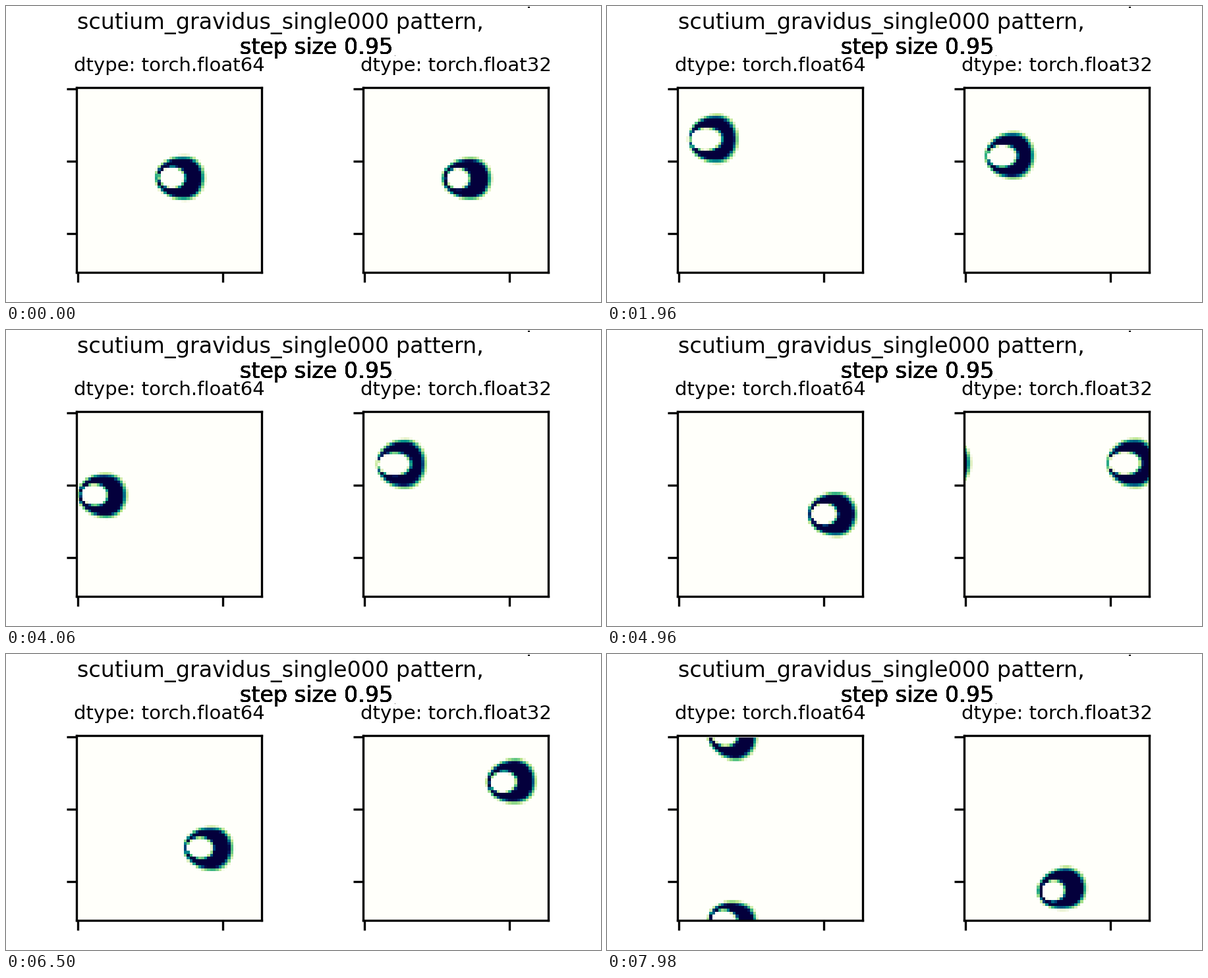
A matplotlib script that plays this animation: 903x450 px, repeating every 8 s.

```python
import numpy as np
import matplotlib.pyplot as plt
from matplotlib.animation import FuncAnimation
from matplotlib.colors import LinearSegmentedColormap
from matplotlib.patches import Rectangle

W, H, DPI = 903, 450, 300
FRAMES, INTERVAL = 400, 20
N = 64                      # cells per side
SIDE = 281                  # panel side in pixels
CELL = SIDE / N
TOP, LEFT = 124.2, (107, 542)
SPEED = 10.6                # pixels per frame

CMAP = LinearSegmentedColormap.from_list("lagoon", [
    (0, "#fffffa"), (0.12, "#f0f5d8"), (0.3, "#b9e68c"), (0.5, "#46be82"),
    (0.65, "#008c8c"), (0.8, "#004c82"), (0.9, "#04165a"), (1, "#04003c")])


def bump(n, centre, width, power=2):
    return np.exp(-(abs(n - centre) / width) ** power)


def travel(n, lag, brake):
    """Distance along x: steady, with an early lag and a late slowdown."""
    return (265 + SPEED * n - lag * (1 - np.exp(-n / 60))
            - brake * (n / FRAMES) ** 10)


def weaving(n):
    """Swings up and down, then dives; returns x, y and half height."""
    y = (241 - 42 * np.cos(2 * np.pi * (n - 118) / 290)
         - 14 * np.exp(-n / 15) + 0.218 * max(0, n - 285) ** 1.45)
    return travel(n, 22, 68), y, 7.8 + 1.2 * bump(n, 127, 45)


def climbing(n):
    """Rises to a level flight, then climbs off the top."""
    y = 203 + 60 * bump(n, 0, 105) - 0.138 * max(0, n - 310) ** 1.52
    return travel(n, 3, 21), y, 7.4 + 1.3 * bump(n, 200, 125, 4)


def glider(cx, cy, angle, size):
    """Crescent with a soft rim, centred at a cell position."""
    j, i = np.mgrid[0:N, 0:N]
    dx = (i - cx + N / 2) % N - N / 2
    dy = (j - cy + N / 2) % N - N / 2
    u = dx * np.cos(angle) + dy * np.sin(angle)
    w = dy * np.cos(angle) - dx * np.sin(angle)

    du = u - 1.6
    reach = np.where(du > 0, 7.3, 10.8)
    rim = (1 - np.hypot(du / reach, w / (size + 0.4))) * 8
    body = rim / np.interp(u, [-8, 0, 8], [0.9, 1.7, 2.5])

    grow = (size - 7.4) / 1.5
    hx, hy = 3.5 + 1.7 * grow, 3.1 + 0.4 * grow
    hu = u + 3.5 - 0.7 * grow
    gap = (np.hypot(hu / hx, w / hy) - 1) * hy
    hole = gap / np.interp(hu, [-hx, hx], [0.5, 1.2])

    cells = np.clip(np.minimum(body, hole), 0, 1)
    cells[0] = 0            # the top row stays empty
    return cells


def state(path, n):
    x, y, size = path(n)
    dx, dy, _ = np.subtract(path(n + 2), path(max(n - 2, 0)))
    return glider((x - LEFT[0]) / CELL - 0.5, (y - TOP) / CELL - 0.5,
                  np.arctan2(dy, dx), size)


plt.rcParams["font.family"] = "DejaVu Sans"
fig = plt.figure(figsize=((W + 0.001) / DPI, (H + 0.001) / DPI), dpi=DPI,
                 facecolor="white")


def label(x, y, text):
    fig.text(x / W, 1 - y / H, text, fontsize=8, ha="left", va="baseline")


def speck(x, y, w, h, color):
    fig.add_artist(Rectangle((x / W, 1 - (y + h) / H), w / W, h / H,
                             transform=fig.transFigure, color=color, lw=0))


label(108, 35, "scutium_gravidus_single000 pattern,")
for _ in range(12):         # overprinted line with hard edges
    label(355, 73, "step size 0.95")
speck(792, 1, 3, 2, "black")
speck(590, 75, 1, 1, "#555555")

panels = []
for left, path, bits in zip(LEFT, (weaving, climbing), (64, 32)):
    ax = fig.add_axes([left / W, 1 - (TOP + SIDE) / H, SIDE / W, SIDE / H])
    image = ax.imshow(state(path, 0), cmap=CMAP, vmin=0, vmax=1,
                      interpolation="nearest", aspect="auto")
    ax.set_xticks([0, 50], labels=[])
    ax.set_yticks([0, 25, 50], labels=[])
    ax.set_title(f"dtype: torch.float{bits}", fontsize=7)
    panels.append((image, path))


def update(n):
    for image, path in panels:
        image.set_data(state(path, n))
    return [image for image, _ in panels]


anim = FuncAnimation(fig, update, frames=FRAMES, interval=INTERVAL,
                     repeat=True, repeat_delay=0, blit=False)
plt.show()
```
